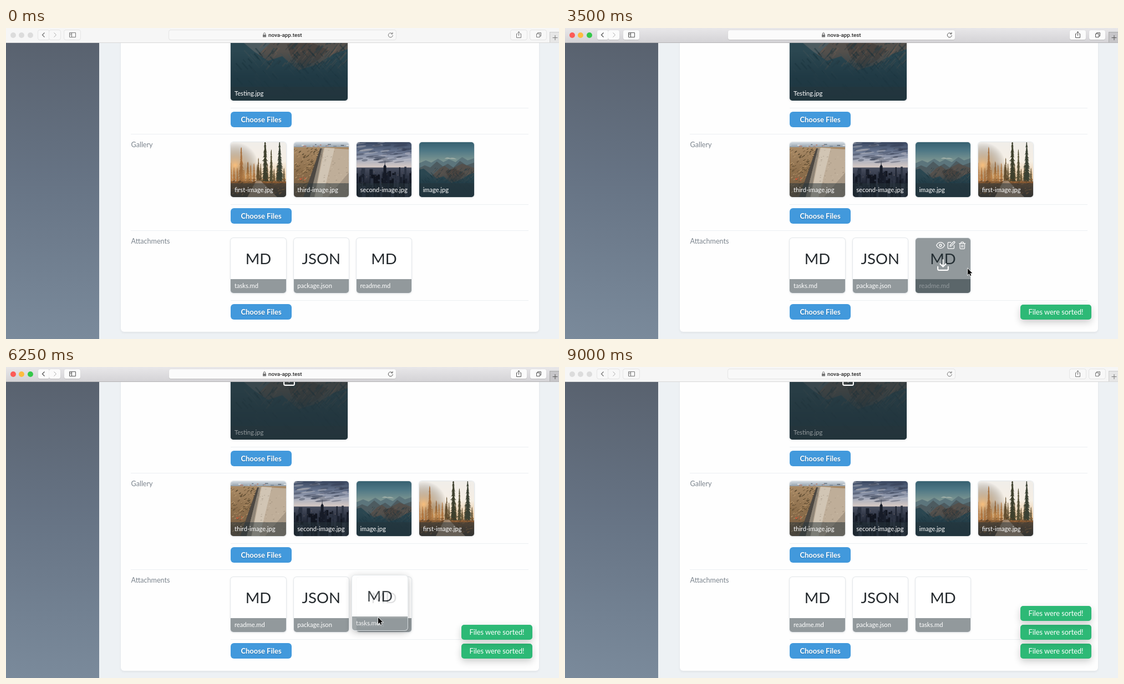
An HTML page with a canvas that plays this animation: 997 by 561 pixels, repeating every 9.25 s.

```html
<!DOCTYPE html>
<html lang="en">
<head>
<meta charset="utf-8">
<title>Sorting files</title>
<style>
  html, body { margin: 0; width: 100%; height: 100%; overflow: hidden; background: #edf1f4; }
  body { position: relative; font: 12.6px/20px Lato, sans-serif; color: #7c858e; }
  body div, header, header *, canvas, .icon, #cursor { position: absolute; box-sizing: border-box; }
  #side { left: 0; top: 27px; width: 168px; height: 534px; background: linear-gradient(#59626f, #667384 45%, #7a8a9b); }
  #panel { left: 207px; top: -50px; width: 753.5px; height: 597.5px; border-radius: 6px; background: #fefefe; box-shadow: 0 2px 4px rgba(0,0,0,.06); }
  .line { height: 1px; right: 55px; background: #eceff2; }
  .button { left: 405px; width: 110px; height: 28px; border-radius: 6px; background: #4299dc; color: #fff;
    font-weight: bold; font-size: 13px; line-height: 28px; text-align: center; text-shadow: 0 1px 2px rgba(0,0,0,.22); }
  .card { width: 99.2px; height: 99.2px; border-radius: 5px; overflow: hidden; background: #fff;
    box-shadow: 0 0 0 1px #e3e7ea, 0 1px 4px rgba(0,0,0,.1); }
  .card.drag { opacity: .86; box-shadow: 0 0 0 1px #e3e7ea, 0 3px 14px rgba(0,0,0,.32); }
  .card canvas { width: 100%; height: 100%; }
  .kind { width: 100%; font-size: 27.5px; line-height: 74px; text-align: center; color: #23282c; }
  .caption { bottom: 0; width: 100%; height: 25px; padding-left: 6.5px; background: rgba(38,52,58,.5);
    color: #fff; font-size: 11.2px; line-height: 24px; white-space: nowrap; }
  .hover { inset: 0; background: rgba(38,52,58,.5); }
  .icon { fill: none; stroke: #fff; stroke-width: 2; stroke-linecap: round; stroke-linejoin: round; }
  .toast { left: 821px; width: 128px; height: 26.5px; border-radius: 5px; background: #2db976; color: #fff;
    font-size: 12.8px; line-height: 26px; text-align: center; white-space: nowrap; box-shadow: 0 5px 13px rgba(0,0,0,.2); }
  header { left: 0; top: 0; width: 997px; height: 27px; background: #f6f6f6; border-bottom: 1px solid #d8d8d8; overflow: hidden; }
  header i { width: 10px; height: 10px; top: 7.5px; border-radius: 5px; background: #dcdcdc; }
  header b { top: 4px; height: 17px; border-radius: 3px; background: #f8f8f8; box-shadow: 0 0 0 .7px #dedede; }
  header span { left: 473px; top: 3px; font: 500 9.9px/20px Roboto, sans-serif; color: #2b2b2b; white-space: nowrap; }
  header svg { left: 0; top: 0; fill: none; stroke: #777; }
  header u { left: 980px; top: 7px; width: 18px; height: 20px; background: #e6e6e6; border: 1px solid #ccc; }
  header.on { background: linear-gradient(#e8e7e9, #d4d3d6); border-color: #b5b4b6; }
  header.on i { background: var(--c); }
  header.on b { background: #fbfbfb; box-shadow: 0 .5px 1px #aaa; }
  header.on svg { stroke: #555; }
  header.on u { background: #c6c5c8; border-color: #aaa; }
</style>
</head>
<body>
<div id="side"></div>
<div id="panel"></div>
<script>
const STEP = 250, STEPS = 37, PITCH = 113.25, LEFT = 405.4;
const ROW_Y = { gallery: 205.7, files: 378.9 };

let seed = 11;
const random = (a = 0, b = 1) => a + (b - a) * (seed = seed * 16807 % 2147483647) / 2147483647;

function add(parent, cls, style = {}, html = '') {
  const el = document.createElement('div');
  el.className = cls;
  el.innerHTML = html;
  for (const key in style) el.style[key] = style[key] + 'px';
  return parent.appendChild(el);
}

// Photo helpers, in a 100 by 100 space
const fill = (c, color, path) => { c.fillStyle = color; c.fill(new Path2D(path)); };

function fade(c, y0, y1, ...colors) {
  const g = c.createLinearGradient(0, y0, 0, y1);
  colors.forEach((color, i) => g.addColorStop(i / (colors.length - 1), color));
  c.fillStyle = g;
  c.fillRect(0, y0, 100, y1 - y0);
}

function glow(c, x, y, r, color) {
  const g = c.createRadialGradient(x, y, 0, x, y, r);
  g.addColorStop(0, color);
  g.addColorStop(1, 'transparent');
  c.fillStyle = g;
  c.fillRect(0, 0, 100, 100);
}

function flecks(c, n, [x, y, w, h], [dx, dy], colors) {
  for (let i = 0; i < n; i++) {
    const px = x + random() * w, py = y + random() * h, k = random(.3, 1);
    c.strokeStyle = colors[i % colors.length];
    c.lineWidth = random(.5, 1.5);
    c.beginPath();
    c.moveTo(px, py);
    c.lineTo(px + dx * k, py + dy * k);
    c.stroke();
  }
}

function pine(c, x, top, bottom, width, color) {
  c.fillStyle = color;
  c.fillRect(x - .5, top, 1, bottom - top);
  for (let y = top; y < bottom; y += 2.2) {
    const w = width * (.15 + .85 * (y - top) / (bottom - top)) * random(.55, 1);
    fill(c, color, `M${x} ${y - 2}L${x + w} ${y + 3}L${x} ${y + 2}L${x - w * random(.7, 1.1)} ${y + 3}Z`);
  }
}

const photos = {
  forest(c) {
    fade(c, 0, 70, '#f1eeea', '#f6efe4', '#e9c396');
    glow(c, 8, 42, 42, 'rgba(250,178,96,.75)');
    for (let x = 0; x < 100; x += 6) pine(c, x, random(38, 52), 74, 5, x < 45 ? '#b87a41' : '#6c5a3a');
    pine(c, 19, 10, 70, 8, '#a8713f');
    pine(c, 31, 36, 72, 6, '#9a6636');
    pine(c, 50, 30, 74, 6, '#685232');
    pine(c, 62, -6, 74, 10, '#3d3f2c');
    pine(c, 73, 14, 74, 7, '#555036');
    pine(c, 88, 0, 74, 11, '#3a4133');
    fade(c, 71, 100, '#8a5c34', '#5d432e', '#3f3329');
    flecks(c, 160, [0, 67, 100, 30], [5, -2], ['#7f5530', '#4b3a28', '#9c6a3a']);
    fill(c, '#a58a70', 'M46 70L54 70L84 100L30 100Z');
    glow(c, 30, 62, 26, 'rgba(255,196,120,.4)');
  },
  road(c) {
    fade(c, 0, 10, '#d5dde4', '#8b98a3');
    fade(c, 9, 100, '#a98a66', '#8d6f4c', '#6c5640');
    flecks(c, 18, [0, 4, 100, 4], [6, 0], ['#f0f0ee', '#596573', '#b3664f']);
    flecks(c, 190, [0, 12, 45, 85], [5, -3], ['#6e5639', '#b5946a', '#54462f']);
    fill(c, '#bfae99', 'M48 10L100 13V100H24Z');
    fill(c, '#a59684', 'M62 100L100 55V100Z');
    fill(c, '#d1c5b4', 'M56 10L74 11L52 100H38Z');
    fill(c, '#4d4842', 'M48 11L51 11L29 100H17Z');
    fill(c, '#8f8577', 'M51 11L54 11L37 100H29Z');
    flecks(c, 90, [42, 14, 58, 84], [3, -1], ['rgba(120,105,88,.35)', 'rgba(225,212,192,.35)']);
    flecks(c, 12, [9, 62, 12, 8], [2, 1], ['#e2583a']);
  },
  city(c) {
    fade(c, 0, 48, '#38465f', '#66738d', '#a9aebd', '#e0cfc6');
    for (let i = 0; i < 60; i++) {
      const y = random(1, 36);
      c.fillStyle = i % 3 ? 'rgba(46,54,74,.38)' : 'rgba(226,220,222,.3)';
      c.beginPath();
      c.ellipse(random(0, 100), y, random(4, 14), random(.7, 2.2), -.12, 0, 7);
      c.fill();
    }
    fade(c, 46, 100, '#4a5061', '#222836', '#131822');
    for (let i = 0; i < 75; i++) {
      c.fillStyle = ['#1a202d', '#2c3342', '#11151f'][i % 3];
      c.fillRect(random(-3, 100), random(44, 56) + i * .45, random(2, 7), 60);
    }
    fill(c, '#161b27', 'M47 100V58L49 55V44L51 41L51.5 32L52 41L54 44V55L56 58V100Z');
    flecks(c, 70, [0, 54, 100, 40], [.7, 0], ['#b59c80', '#59647a', '#3a4456']);
  },
  mountains(c) {
    fade(c, 0, 46, '#376171', '#4f7886', '#74908f', '#97a198');
    fill(c, 'rgba(196,199,187,.55)', 'M46 30Q51 26 56 29Q62 27 68 31Z');
    fill(c, '#5c757c', 'M0 38L12 33L22 37L34 30L44 36L54 31L66 36L78 27L88 33L100 29V70H0Z');
    fill(c, '#4d5b60', 'M0 47L10 42L20 46L32 35L43 44L52 39L62 46L74 34L86 42L100 37V100H0Z');
    fill(c, '#54504c', 'M24 60L38 47L46 43L56 50L68 44L78 39L100 47V80H24Z');
    fill(c, '#2b4751', 'M0 50L8 48L20 58L32 66L44 62L58 74L74 69L88 60L100 56V100H0Z');
    fill(c, '#49433f', 'M48 52L64 48L84 57L74 66L62 72L52 63Z');
    flecks(c, 130, [30, 46, 70, 24], [-6, 7], ['rgba(38,53,60,.5)', 'rgba(124,98,82,.3)', 'rgba(40,62,70,.5)']);
    flecks(c, 110, [0, 52, 100, 46], [7, 8], ['rgba(66,84,88,.35)', 'rgba(22,46,56,.45)']);
    fade(c, 58, 100, 'rgba(29,54,65,0)', 'rgba(29,54,65,.75)', '#1d3641');
  }
};

const icon = (x, y, size, path) =>
  `<svg class="icon" viewBox="0 0 24 24" style="left:calc(${x} - ${size / 2}px);top:calc(${y} - ${size / 2}px)" width="${size}" height="${size}"><path d="${path}"/></svg>`;
const TOOLS =
  icon('45px', '13px', 16, 'M1 12s4-8 11-8 11 8 11 8-4 8-11 8S1 12 1 12zM9 12a3 3 0 1 0 6 0 3 3 0 1 0-6 0') +
  icon('65px', '13px', 15, 'M11 4H4a2 2 0 0 0-2 2v14a2 2 0 0 0 2 2h14a2 2 0 0 0 2-2v-7M18.5 2.5a2.1 2.1 0 0 1 3 3L12 15l-4 1 1-4z') +
  icon('84px', '13px', 14.5, 'M3 6h18M19 6v14a2 2 0 0 1-2 2H7a2 2 0 0 1-2-2V6M8 6V4a2 2 0 0 1 2-2h4a2 2 0 0 1 2 2v2M10 11v6M14 11v6') +
  icon('50%', '49%', 25, 'M21 15v4a2 2 0 0 1-2 2H5a2 2 0 0 1-2-2v-4M7 10l5 5 5-5M12 15V3');

function makeCard(name, art, size = 99.2) {
  const card = add(document.body, 'card', { width: size, height: size });
  if (photos[art]) {
    const canvas = card.appendChild(document.createElement('canvas'));
    canvas.width = canvas.height = size * 2;
    const c = canvas.getContext('2d');
    c.scale(size / 50, size / 50);
    seed = 11;
    photos[art](c);
  } else add(card, 'kind', {}, art);
  add(card, 'caption', {}, name);
  card.hover = add(card, 'hover', {}, TOOLS);
  return card;
}

function place(card, x, y, hover = false) {
  card.style.left = x + 'px';
  card.style.top = y + 'px';
  card.hover.hidden = !hover;
}

// Static page
for (const [left, top] of [[405, 144], [225, 191], [405, 318], [225, 365], [405, 491]])
  add(document.body, 'line', { left, top, width: 942 - left });
for (const top of [151, 324.5, 498]) add(document.body, 'button', { top }, 'Choose Files');
add(document.body, '', { left: 225.5, top: 201 }, 'Gallery');
add(document.body, '', { left: 225.5, top: 375 }, 'Attachments');

const testing = makeCard('Testing.jpg', 'mountains', 211);
const FILES = {
  first: ['first-image.jpg', 'forest'],
  third: ['third-image.jpg', 'road'],
  second: ['second-image.jpg', 'city'],
  image: ['image.jpg', 'mountains'],
  tasks: ['tasks.md', 'MD'],
  pack: ['package.json', 'JSON'],
  readme: ['readme.md', 'MD']
};
const cards = {};
for (const id in FILES) cards[id] = makeCard(...FILES[id]);

// Times below count steps of 250 ms
const DRAGS = [
  { id: 'first', row: 'gallery', from: 7, drop: 11, dx: 63, dy: 66 },
  { id: 'readme', row: 'files', from: 17, drop: 20, dx: 84, dy: 64 },
  { id: 'tasks', row: 'files', from: 24, drop: 29, dx: 47, dy: 77 }
];
for (const drag of DRAGS) {
  drag.card = makeCard(...FILES[drag.id]);
  drag.card.classList.add('drag');
}
const TOASTS = [13, 21, 30];
const toasts = TOASTS.map((_, i) => add(document.body, 'toast', { top: 499.3 - 34 * i }, 'Files were sorted!'));

const PATH = [
  [1, 640, 175], [2, 560, 185], [3, 500, 240], [4, 480, 262], [6, 468, 271], [7, 480, 272],
  [8, 585, 276], [9, 745, 281], [10, 844, 283], [11, 838, 285], [12, 800, 330], [13, 735, 420],
  [15, 716, 448], [16, 716, 448], [17, 690, 447], [18, 458, 440], [19, 475, 441], [21, 472, 445],
  [22, 530, 452], [23, 565, 455], [24, 600, 453], [25, 671, 452], [26, 723, 449], [27, 721, 448],
  [29, 721, 448], [30, 734, 448], [31, 734, 448], [32, 726, 446], [33, 790, 270]
];

function cursorAt(step) {
  const i = PATH.findIndex(p => p[0] >= step);
  if (i < 0 || step < PATH[0][0]) return null;
  const [s1, x1, y1] = PATH[i], [s0, x0, y0] = PATH[Math.max(0, i - 1)];
  const k = s1 > s0 ? (step - s0) / (s1 - s0) : 1;
  return [x0 + (x1 - x0) * k, y0 + (y1 - y0) * k];
}

// Browser bar
const bar = document.body.appendChild(document.createElement('header'));
bar.innerHTML =
  ['#fc5b57', '#fdbc40', '#34c84a'].map((c, i) => `<i style="left:${7.5 + 15.5 * i}px;--c:${c}"></i>`).join('') +
  [[58, 19.5], [78.2, 19.5], [105, 29], [294, 409], [910, 29], [945, 29]]
    .map(([x, w]) => `<b style="left:${x}px;width:${w}px"></b>`).join('') +
  `<u></u><span>nova-app.test</span><svg width="997" height="27">
    <path d="M69.5 8.5l-4 4 4 4" stroke-width="1.3"/><path d="M86.5 8.5l4 4-4 4" stroke="#aaa"/>
    <path d="M114.5 8.5h11v8h-11zM118.5 8.5v8M115.5 10.5h2M115.5 12.5h2"/>
    <path d="M463 12h6v4.5h-6z" fill="#777" stroke="none"/><path d="M464.3 12v-1.5a1.7 1.7 0 0 1 3.4 0V12"/>
    <path d="M696.5 10.5a4 4 0 1 0 .8 2.5M697 7.8v3h-3"/>
    <path d="M922.5 10.5h-2v7h8v-7h-2M924.5 14V6.5M922.3 8.7l2.2-2.2 2.2 2.2"/>
    <path d="M956.5 10.5h6v6h-6zM958.5 10.5v-2h6v6h-2"/><path d="M985.5 17.5h9M990 13v9"/></svg>`;

document.body.insertAdjacentHTML('beforeend',
  `<svg id="cursor" width="14" height="18" viewBox="-2 -2 14 18" style="margin:-2px">
    <path d="M0 0V11.5L2.7 9L4.6 13L6.4 12.2L4.6 8.3H8.3Z" stroke="#fff" stroke-width="1.4" paint-order="stroke"/></svg>`);
const pointer = document.getElementById('cursor');

function show(step) {
  const cursor = cursorAt(step);
  const rows = { gallery: ['first', 'third', 'second', 'image'], files: ['tasks', 'pack', 'readme'] };
  let dragging = false;

  for (const { id, row, from, drop, dx, dy, card } of DRAGS) {
    const active = step >= from && step < drop;
    card.style.display = active ? '' : 'none';
    if (step < from) continue;
    const order = rows[row];
    const slot = Math.round((cursorAt(Math.min(step, drop - 1))[0] - 455) / PITCH);
    order.splice(order.indexOf(id), 1);
    order.splice(Math.max(0, Math.min(slot, order.length)), 0, id);
    if (active) {
      dragging = true;
      place(card, cursor[0] - dx + .4, cursor[1] - dy + .5);
    }
  }

  for (const row in rows) rows[row].forEach((id, i) => {
    const x = LEFT + i * PITCH, y = ROW_Y[row];
    const inside = cursor && cursor[0] > x && cursor[0] < x + 99 && cursor[1] > y && cursor[1] < y + 99;
    place(cards[id], x, y, inside && !dragging);
  });
  place(testing, LEFT, -80.3, step >= 21);

  toasts.forEach((toast, i) => toast.hidden = step < TOASTS[i]);
  bar.classList.toggle('on', step > 0 && step < STEPS - 1);
  pointer.style.display = cursor ? '' : 'none';
  if (cursor) {
    pointer.style.left = cursor[0] + 'px';
    pointer.style.top = cursor[1] + 'px';
  }
}

let shown = -1;
const start = performance.now();
function tick() {
  const step = Math.floor((performance.now() - start) / STEP) % STEPS;
  if (step !== shown) show(shown = step);
  requestAnimationFrame(tick);
}
tick();
</script>
</body>
</html>
```
